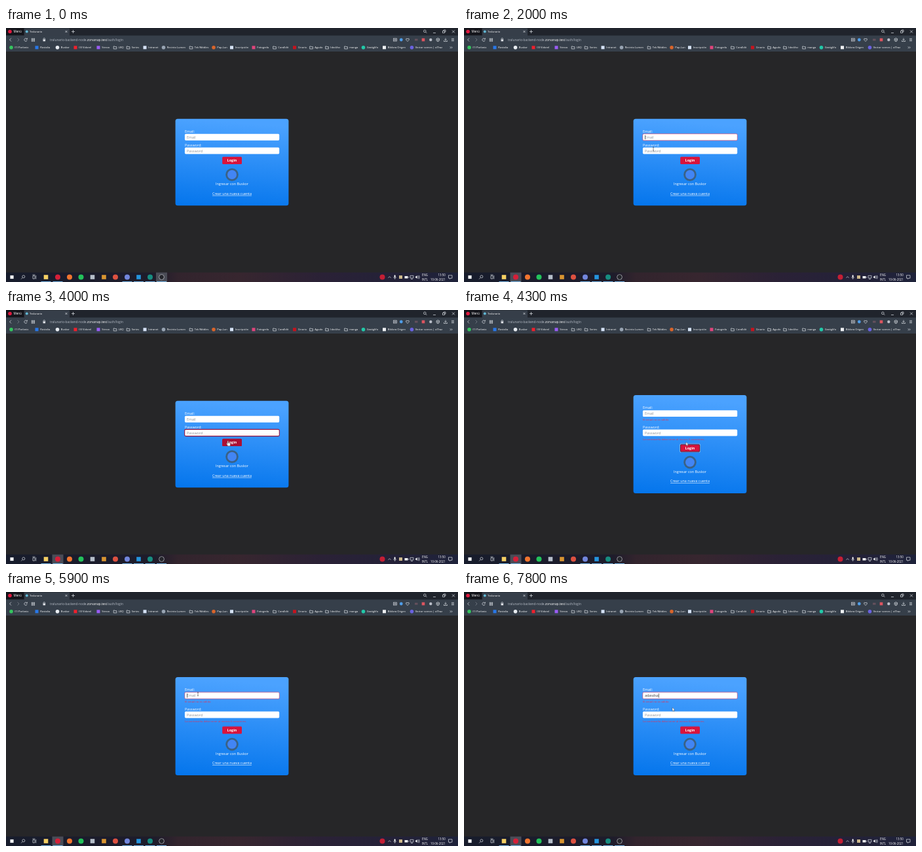
Animation, 690 px wide and 388 px high, one loop 8000 ms. Source, as an HTML page:

```html
<!DOCTYPE html>
<html lang="es">
<head>
<meta charset="utf-8">
<title>Login</title>
<style>
html, body { margin: 0; width: 100%; height: 100%; overflow: hidden; background: #262628; }
svg { display: block; width: 100%; height: 100%; }
text { font: 5.4px "Open Sans", "Noto Sans", sans-serif; fill: #fff; white-space: pre; }
.small { font-size: 4.05px; font-weight: 500; }
.tray { font-size: 4.4px; font-weight: 500; }
.url { font-size: 4.8px; fill: #b4bac4; }
.hint { fill: #8b9198; }
.error { font-size: 4.2px; fill: #d43a62; }
.mid { text-anchor: middle; }
.bold { font-weight: 700; }
.line { fill: none; stroke: #dfe2e8; stroke-width: .7; }

.card, .up, .down, .late, .mail-ring, .pass-ring, .login-ring, .hover,
.was-active, .now-active, .arrow, .beam, .hand {
  animation: 8s step-end infinite;
}
.card { animation-name: grow; }
.up { animation-name: up; }
.down { animation-name: down; }
.late { animation-name: late; }
.mail-ring { animation-name: mail; }
.pass-ring { animation-name: pass; }
.login-ring { animation-name: login; }
.hover, .hand { animation-name: hand; }
.was-active { animation-name: before; }
.now-active { animation-name: after; }
.arrow { animation-name: arrow; }
.beam { animation-name: beam; }
.pointer { animation: move 8s ease-in-out infinite; }

@keyframes grow { 0% { y: 138.7px; height: 132.6px; } 53%, 100% { y: 130.1px; height: 149.8px; } }
@keyframes up { 0% { transform: none; } 53%, 100% { transform: translateY(-8.6px); } }
@keyframes down { 0% { transform: none; } 53%, 100% { transform: translateY(8.6px); } }
@keyframes late { 0% { opacity: 0; } 53%, 100% { opacity: 1; } }
@keyframes mail { 0% { opacity: 0; } 21.2% { opacity: 1; } 45% { opacity: 0; } 73.6%, 100% { opacity: 1; } }
@keyframes pass { 0% { opacity: 0; } 45% { opacity: 1; } 52.4%, 100% { opacity: 0; } }
@keyframes login { 0% { opacity: 0; } 52.4% { opacity: 1; } 73.6%, 100% { opacity: 0; } }
@keyframes before { 0% { opacity: 1; } 21.2%, 100% { opacity: 0; } }
@keyframes after { 0% { opacity: 0; } 21.2%, 100% { opacity: 1; } }
@keyframes hand { 0% { opacity: 0; } 36% { opacity: 1; } 40% { opacity: 0; } 48% { opacity: 1; } 53%, 100% { opacity: 0; } }
@keyframes arrow {
  0% { opacity: 0; } 8.7% { opacity: 1; } 16% { opacity: 0; } 33.7% { opacity: 1; } 36% { opacity: 0; }
  40% { opacity: 1; } 42% { opacity: 0; } 46.5% { opacity: 1; } 48% { opacity: 0; }
  53% { opacity: 1; } 70% { opacity: 0; } 83.7%, 100% { opacity: 1; }
}
@keyframes beam {
  0% { opacity: 0; } 16% { opacity: 1; } 33.7% { opacity: 0; } 42% { opacity: 1; }
  46.5% { opacity: 0; } 70% { opacity: 1; } 83.7%, 100% { opacity: 0; }
}
@keyframes move {
  0%, 8.75% { transform: translate(531px, 214px); }
  17.5%, 21.25% { transform: translate(280px, 165px); }
  25% { transform: translate(289px, 184.6px); }
  31.25%, 33.75% { transform: translate(308px, 190px); }
  37.5%, 38.5% { transform: translate(333px, 199px); }
  43.75%, 45% { transform: translate(336px, 188px); }
  50% { transform: translate(339px, 200.3px); }
  53%, 56.25% { transform: translate(338.7px, 201.6px); }
  66.25% { transform: translate(264px, 188px); }
  71.25%, 82.5% { transform: translate(293px, 156px); }
  87.5%, 100% { transform: translate(318px, 176.3px); }
}
</style>
</head>
<body>
<svg viewBox="0 0 690 388" preserveAspectRatio="none">
  <defs>
    <linearGradient id="blue" x1=".1" y1="0" x2="0" y2="1">
      <stop stop-color="#4ba2ff"/><stop offset="1" stop-color="#0475ec"/>
    </linearGradient>
    <linearGradient id="bar">
      <stop stop-color="#171c2c"/><stop offset=".33" stop-color="#1e1c2b"/>
      <stop offset=".38" stop-color="#32242d"/><stop offset=".52" stop-color="#37262f"/>
      <stop offset=".7" stop-color="#2a2136"/><stop offset="1" stop-color="#1e223a"/>
    </linearGradient>
  </defs>

  <!-- browser -->
  <rect width="690" height="388" fill="#262628"/>
  <rect width="690" height="12" fill="#20242c"/>
  <rect width="27" height="11" fill="#14151b"/>
  <path d="M28 12V1.5q0-1 1-1H96q1 0 1 1V12Z" fill="#363e49"/>
  <rect y="11.5" width="690" height="24.5" fill="#363f4a"/>
  <circle cx="6" cy="5.5" r="2.8" fill="#e0193f"/>
  <text x="11.5" y="7.4" class="small" style="font-size:4.6px">Menú</text>
  <circle cx="31.8" cy="5.5" r="2" fill="#61b8d4"/>
  <text x="36" y="7.2" class="small">Tralunario</text>
  <g class="line">
    <path d="M90.5 4l3 3m0-3l-3 3M100 5.5h5m-2.5-2.5v5"/>
    <circle cx="639.3" cy="4.8" r="1.8"/>
    <path d="M640.6 6.1l1.8 1.8M652 7.5h4M666.5 4.5h3v3h-3zM668 4.5V3h3v3h-1.5M681 3.5l4 4m0-4l-4 4"/>
    <path d="M8 15.5L5.5 18 8 20.5"/>
    <path d="M17.5 15.5L20 18l-2.5 2.5" opacity=".45"/>
    <path d="M31.8 16.7a2.2 2.2 0 1 0 .4 2M32.4 15.3v1.8h-1.8"/>
    <path d="M39.2 16h1.6v1.6h-1.6zm2.8 0h1.6v1.6H42zm-2.8 2.7h1.6v1.6h-1.6zm2.8 0h1.6v1.6H42z"/>
    <path d="M57 17.5v-.8a1.3 1.3 0 0 1 2.6 0v.8"/>
    <rect x="591.5" y="16" width="5" height="4"/><circle cx="594" cy="18" r="1"/>
    <path d="M613 20.5l-2.3-2.4q-.4-2.2 1.3-2.1l1 .9 1-.9q1.8 0 1.3 2.1Z"/>
    <path d="M659.3 15.4l2.2 1.2v2.8l-2.2 1.2-2.2-1.2v-2.8zM657.1 16.6l2.2 1.2 2.2-1.2m-2.2 1.2v2.8"/>
    <path d="M671 15.3v3.5m-1.5-1.3l1.5 1.5 1.5-1.5M668.5 19v1.5h5V19M680 16.3h4m-4 1.7h4m-4 1.7h4"/>
    <path d="M677.8 28.4l1.3 1.4-1.3 1.4m2.1-2.8l1.3 1.4-1.3 1.4"/>
  </g>
  <rect x="56.5" y="17.3" width="3.6" height="3" fill="#dfe2e8"/>
  <circle cx="603.3" cy="18" r="2.4" fill="#4f9de8"/>
  <rect x="624" y="16.5" width="4.5" height="3" fill="#65515d"/>
  <rect x="634.7" y="15.7" width="4.6" height="4.6" fill="#dc5560"/>
  <circle cx="648.3" cy="18" r="2.2" fill="#b9bec8"/>
  <text x="67" y="19.6" class="url">tralunario-backend-node.<tspan fill="#fff">zorvanap.test</tspan>/auth/login</text>
  <g id="marks"></g>

  <!-- login card -->
  <rect class="card" x="258.6" y="138.7" width="172.8" height="132.6" rx="3.5" fill="url(#blue)"/>
  <g class="up">
    <text x="273" y="160">Email:</text>
    <rect x="272.9" y="161.8" width="144.3" height="9.9" rx="1.6" fill="#fff"/>
    <rect class="mail-ring" x="272.8" y="161.7" width="144.5" height="10.1" rx="1.8" fill="none" stroke="#e2486b" stroke-width=".8" stroke-opacity=".85"/>
    <text id="mail" x="276" y="168.9"></text>
    <rect id="caret" y="163.6" width=".6" height="6.6" fill="#222"/>
  </g>
  <text x="273" y="180.8">Password:</text>
  <rect x="272.9" y="182.5" width="144.3" height="9.9" rx="1.6" fill="#fff"/>
  <rect class="pass-ring" x="272.7" y="182.4" width="144.6" height="10.2" rx="1.9" fill="none" stroke="#9c1640" stroke-width="1.1"/>
  <text x="276" y="189.6" class="hint">Password</text>
  <g class="late">
    <text x="273" y="169.2" class="error">El email no es válido</text>
    <text x="273" y="198.6" class="error">La contraseña debe tener al menos 6 caracteres.</text>
  </g>
  <g class="down">
    <rect x="330.2" y="196.7" width="29.8" height="11.4" rx="1.5" fill="#d8143c"/>
    <rect class="hover" x="330.2" y="196.7" width="29.8" height="11.4" rx="1.5" fill="#ab0f33"/>
    <g class="login-ring" fill="none">
      <rect x="329.6" y="196.1" width="31" height="12.6" rx="2" stroke="#fff" stroke-width=".6"/>
      <rect x="330.3" y="196.8" width="29.6" height="11.2" rx="1.5" stroke="#241c2b" stroke-width=".8"/>
    </g>
    <text x="345" y="204.4" class="mid bold" style="font-size:5.5px">Login</text>
    <circle cx="345" cy="224" r="9.8" fill="#3a6286"/>
    <circle cx="345" cy="224" r="7" fill="#4285f4"/>
    <text x="345" y="240.4" class="mid">Ingresar con Buskor</text>
    <text x="345" y="254.8" class="mid" text-decoration="underline">Crear una nueva cuenta</text>
  </g>

  <!-- taskbar -->
  <rect y="373.5" width="690" height="14.5" fill="url(#bar)"/>
  <rect class="was-active" x="229" y="373.5" width="17" height="14.5" fill="#4a4c56"/>
  <rect class="now-active" x="70.5" y="373.5" width="17" height="14.5" fill="#4a4c56"/>
  <g id="apps"></g>
  <g class="line">
    <circle cx="26.8" cy="379.8" r="2"/><path d="M25.3 381.3l-2.2 2.2"/>
    <path d="M41 378.5h3v4.5h-3zM40.5 377h4M45.7 378v5.5"/>
    <path d="M583.5 381.7l2-2 2 2"/>
    <path d="M591.8 380.5a1.8 1.8 0 0 0 3.6 0m-1.8 1.8v1.5"/>
    <path d="M617 378.3h5v3.6h-5zM618 383.5h3"/>
    <path d="M629 378.6q1.5 2 0 4M630.3 377.8q2 2.8 0 5.6"/>
    <path d="M675.5 377.8h5.5v4.4h-2.2l-1.2 1.3v-1.3h-2.1z"/>
  </g>
  <circle cx="574.5" cy="380.5" r="4" fill="#c41f35"/>
  <rect x="592.7" y="377.3" width="1.8" height="4" rx=".9" fill="#fff"/>
  <rect x="600" y="378" width="5" height="5" fill="#cdb98c"/>
  <path d="M608.5 379h5v3.5h-5zM614 380h.6v1.5h-.6zM625 379.5h1.2l1.6-1.5v5l-1.6-1.5H625z" fill="#f0f1f4"/>
  <text x="639.5" y="379.3" class="tray mid">ENG</text>
  <text x="639.5" y="385.7" class="tray mid">INTL</text>
  <text x="670.8" y="379.3" class="tray" text-anchor="end">13:50</text>
  <text x="670.8" y="385.7" class="tray" text-anchor="end">10-06-2021</text>

  <g class="pointer">
    <path class="arrow" d="M0 0V5.6L1.3 4.4 2.2 6.4 3.1 6 2.3 4.1H4Z" fill="#fff" stroke="#222" stroke-width=".35"/>
    <path class="beam" d="M-1-2.7Q0-2.7 0-2.2Q0-2.7 1-2.7M0-2.2V2.2M-1 2.7Q0 2.7 0 2.2Q0 2.7 1 2.7" fill="none" stroke="#1c1c22" stroke-width=".55"/>
    <path class="hand" d="M-.6 0Q0-.6.6 0V2.6L3 3.2Q3.8 3.4 3.7 4.4L3.1 7.6H-.2L-2.2 4.6Q-2-.1-.6 4.4Z" fill="#fff" stroke="#222" stroke-width=".35"/>
  </g>
</svg>

<script>
const $ = id => document.getElementById(id);
const dot = (x, y, r, c) => `<circle cx="${x}" cy="${y}" r="${r}" fill="${c}"/>`;
const box = (x, y, r, c) => `<rect x="${x - r}" y="${y - r}" width="${2 * r}" height="${2 * r}" fill="${c}"/>`;
const folder = x => `<path class="line" d="M${x - 2.3} 28h1.8l.6.7h2.3v3.2h-4.7z"/>`;

// icon x, label, icon colour (none: folder), square icon
const marks = [
  [8, '(1) Parlonix', '#35c45f'], [47, 'Rostalia', '#2878e8', 1], [78.5, 'Buskor', '#e9edf2'],
  [106, '(3) Vidorel', '#f0202c', 1], [141, 'Strevo', '#9a5cf5', 1], [166.5, 'LBQ'], [186.5, 'Series'],
  [212, 'Intranet', '#d5e2f5', 1], [240.5, 'Recinto Lumen', '#98a4b2'], [282.5, 'Tek Nibbles'],
  [317, 'Pap-Lun', '#d9652b'], [344.5, 'Inscripción', '#d5e2f5', 1], [378, 'Fotogrela', '#e0457c', 1],
  [410, 'CoraEdit'], [440.5, 'Cinorix', '#c5141f', 1], [466, 'Agudo'], [490, 'IdeoVez'], [519, 'manga'],
  [545.5, 'Gratiglifo', '#22c9a8'], [577.5, 'Biblora Origen', '#eef0f3', 1], [619.5, 'Vector scenes | olTraz', '#6a62e0']
];
$('marks').innerHTML = marks.map(([x, name, c, square]) =>
  (c ? (square ? box(x, 29.8, 2.5, c) : dot(x, 29.8, 2.8, c)) : folder(x)) +
  `<text class="small" x="${x + 5.3}" y="31.3">${name}</text>`).join('');

// icon x, colour, square, running
const apps = [
  [9, '#f4f5f8', 1], [61, '#f5cf63', 1, 1], [79, '#d51f38', 0, 1], [97, '#f2752f'], [114.5, '#23c25b'],
  [132, '#b6bfca', 1], [149.5, '#d99531', 1], [167, '#dd5140'], [185, '#7286dc', 0, 1],
  [202.5, '#2595de', 1, 1], [220, '#178d80', 0, 1], [237.5, '#d3d5da', 0, 1]
];
$('apps').innerHTML = apps.map(([x, c, square, on], i) =>
  (square ? box(x, 380.5, i ? 3.3 : 2.6, c) : dot(x, 380.5, 4, c)) +
  (on ? `<rect x="${x - 7.5}" y="387" width="15" height="1" fill="#79b9ea"/>` : '')).join('') +
  dot(237.5, 380.5, 3.4, '#25262c');

const typed = 'adasdsa';
const keys = [6700, 7400, 7450, 7500, 7690, 7740, 7790];
const mail = $('mail'), caret = $('caret');
let start, shown;

function frame(now) {
  start ??= now;
  const t = (now - start) % 8000;
  const n = keys.filter(k => t >= k).length;
  if (n !== shown) {
    shown = n;
    mail.textContent = n ? typed.slice(0, n) : 'Email';
    mail.style.fill = n ? '#33373c' : '#8b9198';
    caret.setAttribute('x', 276.2 + (n ? mail.getComputedTextLength() : 0));
  }
  const focus = n ? keys[n - 1] : t >= 5890 ? 5890 : 1690;
  const focused = t >= 5890 || (t >= 1690 && t < 3600);
  caret.style.opacity = focused && (t - focus) % 1000 < 500 ? 1 : 0;
  requestAnimationFrame(frame);
}
requestAnimationFrame(frame);
</script>
</body>
</html>
```
